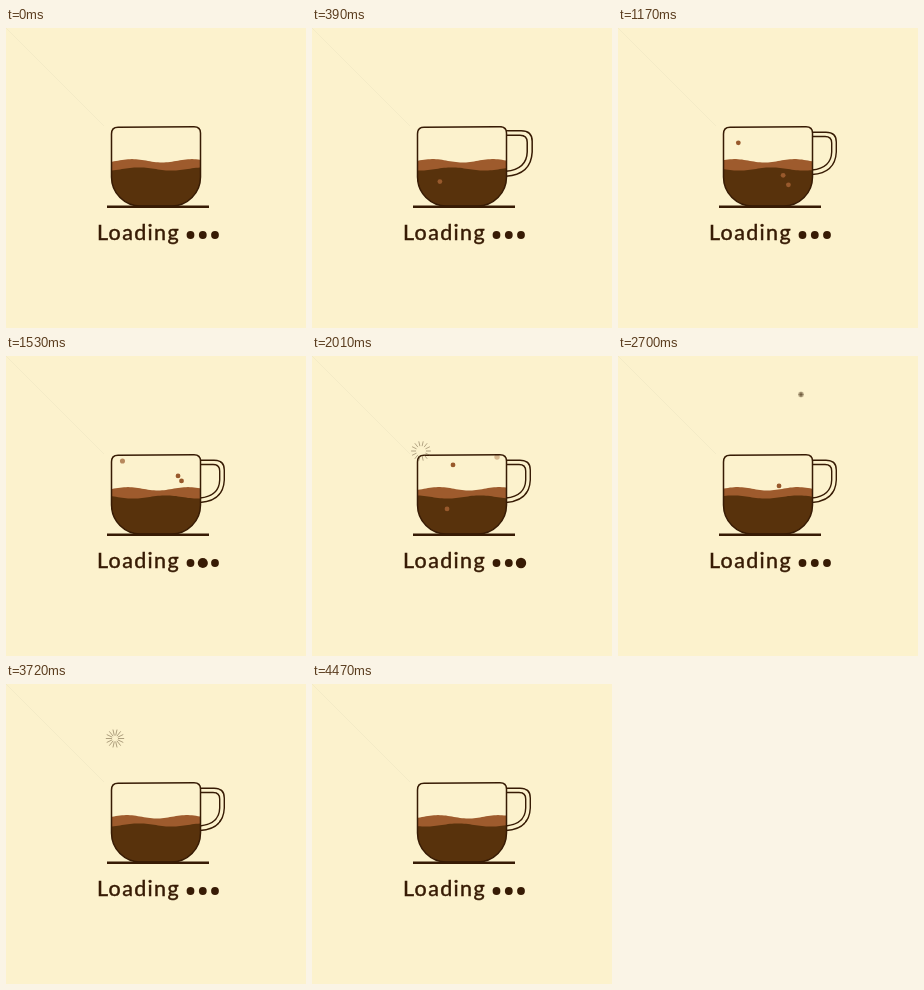
Write an HTML page that moves like this. It is 300 px wide and 300 px high and loops after 4.5 s.

```html
<!DOCTYPE html>
<html lang="en">
<head>
<meta charset="utf-8">
<title>Loading</title>
<style>
  html, body { margin: 0; width: 100%; height: 100%; overflow: hidden; background: #fcf2cd; }
  svg { display: block; width: 100%; height: 100%; }
  text {
    font: 21.5px Lato, "Open Sans", sans-serif; letter-spacing: 1.35px;
    fill: #371b04; stroke: #371b04; stroke-width: .45;
  }
</style>
</head>
<body>
<svg viewBox="0 0 300 300">
  <defs>
    <path id="cup" d="M112 99.300L188 98.700Q194.500 98.700 194.500 105V149A29 29 0 0 1 165.500 178H134.500A29 29 0 0 1 105.500 149V106Q105.500 99.300 112 99.300Z"/>
    <clipPath id="inside"><use href="#cup"/></clipPath>
  </defs>
  <rect width="300" height="300" fill="#fcf2cd"/>
  <path d="M0 0L98 98" stroke="#f0e7c4" stroke-width=".6"/>
  <g id="handle" fill="none" stroke="#371b04" stroke-width="1.4">
    <path d="M194 104.300H208Q218.300 104.300 218.300 114V124Q217.300 145 194 146.500"/>
    <path d="M194 108.500H207Q213.700 108.500 213.700 115V124Q213.200 140 194 142"/>
  </g>
  <use href="#cup" fill="#fcf2cd"/>
  <g clip-path="url(#inside)">
    <path id="foam" fill="#9e5b2d"/>
    <path id="coffee" fill="#58320c"/>
    <g id="bubbles" fill="#98592c"></g>
  </g>
  <use href="#cup" fill="none" stroke="#371b04" stroke-width="1.5"/>
  <path d="M101 178.700H203" stroke="#371b04" stroke-width="2.400"/>
  <g id="bursts" stroke="#6d5a3c" stroke-width=".7" fill="none"></g>
  <text x="91" y="212">Loading</text>
  <g id="dots" fill="#371b04"></g>
</svg>
<script>
const LOOP = 4500;
const $ = id => document.getElementById(id);
const clamp = (v, lo = 0, hi = 1) => Math.min(hi, Math.max(lo, v));

function add(parent, tag, attrs = {}) {
  const el = document.createElementNS("http://www.w3.org/2000/svg", tag);
  set(el, attrs);
  return parent.appendChild(el);
}
function set(el, attrs) {
  for (const k in attrs) el.setAttribute(k, attrs[k]);
}

// Each dot: x position and the times of its pulses
const dots = [
  { x: 184.5, peaks: [820, 2980] },
  { x: 196.8, peaks: [1450, 3440] },
  { x: 209, peaks: [2030, 4110] }
];
// Bubble paths: [time, x, y]
const bubbles = [
  [[150, 130, 171], [780, 124.5, 125.5], [1530, 116.5, 105], [1720, 111, 98]],
  [[900, 160, 168], [1530, 172, 120], [2010, 185, 101], [2090, 186, 97]],
  [[1000, 168, 172], [1530, 175.5, 125], [1960, 180, 98]],
  [[1560, 137, 152], [2010, 141, 109], [2250, 143, 97]],
  [[1800, 128, 172], [2010, 135, 153], [2700, 161, 130], [3200, 170, 97]]
].map(keys => ({ keys, el: add($("bubbles"), "circle") }));
const bursts = [
  { start: 1700, x: 109, y: 95 },
  { start: 2655, x: 183, y: 38.5 },
  { start: 3480, x: 109, y: 54.5 }
];
dots.forEach(d => d.el = add($("dots"), "circle", { cx: d.x, cy: 207 }));
bursts.forEach(b => b.el = add($("bursts"), "path"));

function wave(base, amp, crest, length) {
  let d = "M104 180";
  for (let x = 104; x <= 196; x += 2) {
    const y = base - amp * Math.cos(2 * Math.PI * (x - crest) / length);
    d += `L${x} ${y.toFixed(2)}`;
  }
  return d + "L196 180Z";
}

function rays(inner, outer) {
  let d = "";
  for (let i = 0; i < 14; i++) {
    const a = i * Math.PI / 7, c = Math.cos(a), s = Math.sin(a);
    d += `M${c * inner} ${s * inner}L${c * outer} ${s * outer}`;
  }
  return d;
}

function backOut(p) {
  const k = 1.5, q = p - 1;
  return 1 + (k + 1) * q ** 3 + k * q ** 2;
}

function drawBubble({ keys, el }, t) {
  const i = keys.findIndex(k => t < k[0]);
  if (i < 1) return set(el, { opacity: 0 });
  const [t0, x0, y0] = keys[i - 1], [t1, x1, y1] = keys[i];
  const p = (t - t0) / (t1 - t0), y = y0 + (y1 - y0) * p;
  const fade = clamp((y - 96) / 13);
  set(el, {
    cx: x0 + (x1 - x0) * p, cy: y, r: 2.4 + 0.5 * (1 - fade),
    opacity: Math.min(fade, clamp((t - keys[0][0]) / 150))
  });
}

function drawBurst(b, t) {
  const p = (t - b.start) / 450;
  const on = p > 0 && p < 1;
  set(b.el, { opacity: on ? 1 - 0.4 * p : 0, transform: `translate(${b.x} ${b.y})` });
  if (on) {
    const outer = 10.2 * (1 - (1 - p) ** 3);
    set(b.el, { d: rays(Math.min(outer, 10 * p ** 1.9), outer) });
  }
}

function render(t) {
  const s = backOut(clamp(t / 700));
  set($("handle"), {
    opacity: s > 0.01 ? 1 : 0,
    transform: `translate(194 125) scale(${Math.max(0, s)}) translate(-194 -125)`
  });

  const sway = 121 + 6 * Math.cos(2 * Math.PI * (t - 2050) / 2250);
  set($("foam"), { d: wave(132.8, 1.7, sway, 60) });
  set($("coffee"), { d: wave(141, 1.6, 133 + 65 * t / 3720, 65) });

  for (const d of dots) {
    const pulse = Math.max(...d.peaks.map(c => Math.cos(clamp((t - c) / 270, -1, 1) * Math.PI / 2)));
    set(d.el, { r: 3.9 + 1.3 * pulse });
  }
  bubbles.forEach(b => drawBubble(b, t));
  bursts.forEach(b => drawBurst(b, t));
}

const began = performance.now();
function tick() {
  render((performance.now() - began) % LOOP);
  requestAnimationFrame(tick);
}
render(0);
requestAnimationFrame(tick);
</script>
</body>
</html>
```
